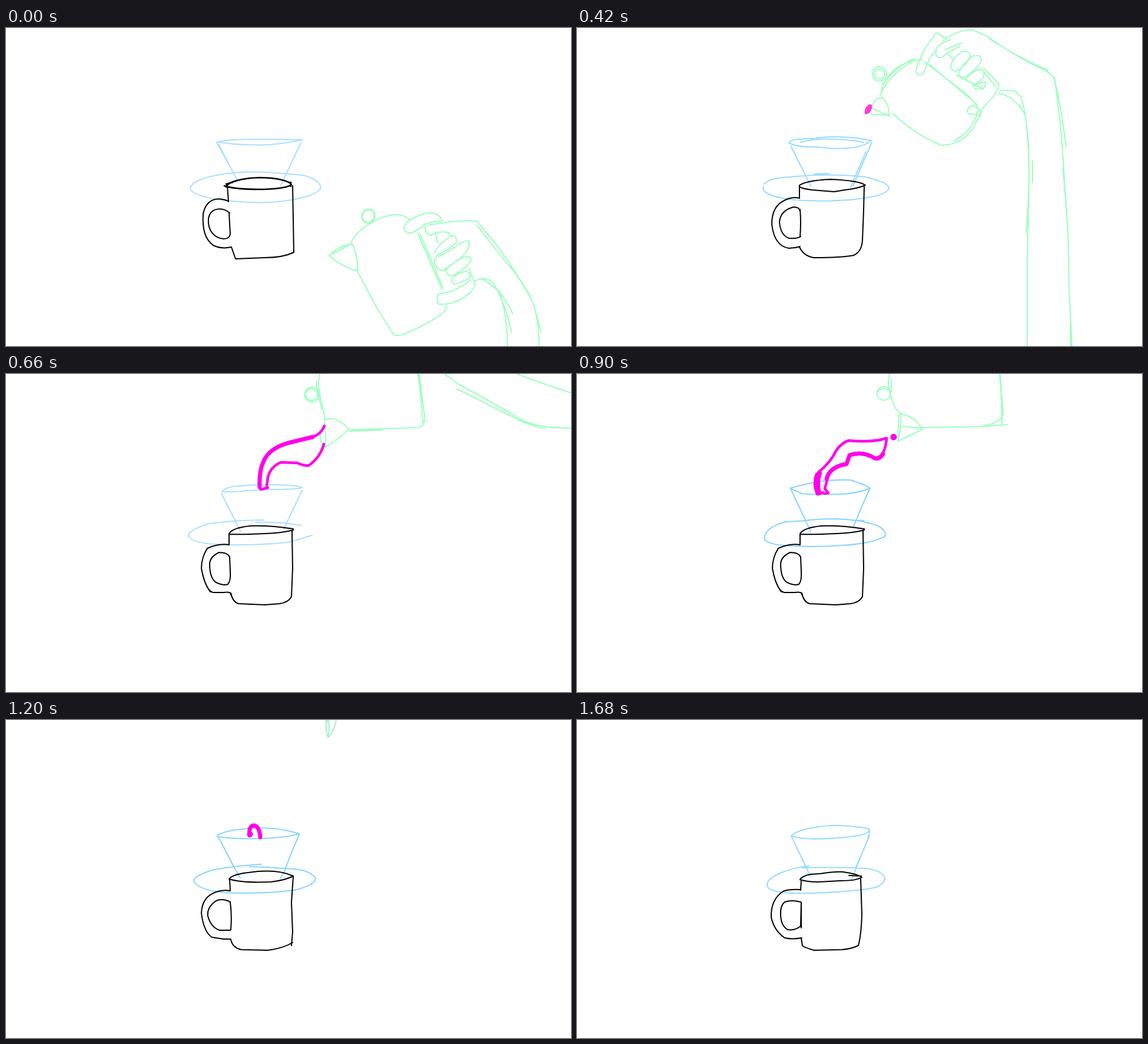
Write an HTML page without scripts that moves like this. It is 960 px wide and 540 px high and loops after 1740 ms.

```html
<!DOCTYPE html>
<html lang="en">
<head>
<meta charset="utf-8">
<title>Pour-over coffee</title>
<style>
html, body { margin: 0; width: 100%; height: 100%; overflow: hidden; background: #fff; }
svg { display: block; width: 100vw; height: 100vh; }
path, circle, ellipse { fill: none; stroke-width: 2; stroke-linecap: round; stroke-linejoin: round; }
.mug { stroke: #000; }
.cone { stroke: #98dbff; }
.pale { stroke: #a8dfff; }
.deep { stroke: #86d4ff; }
.pot { stroke: #9cffbe; }
.pour { stroke: #ff00ea; }
.pour, .pour path { stroke-width: 4.5; }
.fat, .pour .fat { stroke-width: 7; }
.drop { fill: #ff00ea; stroke: none; }
/* 29 drawings, 60 ms each */
.frame { visibility: hidden; animation: show 1740ms step-end infinite; animation-delay: calc((var(--i) - 29) * 60ms); }
@keyframes show { 0% { visibility: visible; } 3.44828%, 100% { visibility: hidden; } }
</style>
</head>
<body>
<svg viewBox="0 0 960 540">
<defs>
  <!-- mug and dripper: a six-drawing wobble -->
  <g id="c0">
    <path class="cone pale" d="M358 194Q370 189 430 189T504 190M362 194Q400 200 450 198Q485 194 503 190M358 194L394 260M361 197L377 228M501 195L482 235L467 267M313 272C318 255 365 246 412 244M378 247C420 241 470 247 505 250C525 255 535 265 535 271C530 285 480 296 435 296.5C390 296 315 290 313 272"/>
    <path class="mug" style="stroke-width:2.6" d="M374 270C375 262 400 255 430 254C460 254 482 260 485 266C478 272 450 274 430 274C400 274 380 271 371 268M374 265L385 262M484 262V269"/>
    <path class="mug" d="M376 267L378 295M487 268L489 381Q470 390 440 390L390 392L383 372M378 294C355 285 340 293 335 315C333 345 340 360 352 369Q367 376 382 372M380 314C368 304 348 304 344 323C342 345 355 357 370 358Q380 358 381 350L379 314"/>
  </g>
  <g id="c1">
    <path class="cone" d="M360 195Q364 187 400 188Q445 180 500 191Q490 200 470 203Q440 207 410 202Q375 203 360 195M380 194Q420 183 487 194M363 200L397 268M501 194L469 268M491 210L465 270M428 247L403 248M318 265Q325 255 362 253Q430 246 490 253Q530 262 530 272Q525 285 480 290Q420 297 360 291Q310 283 317 268"/>
    <path class="mug" d="M378 267Q390 259 430 257Q480 259 490 267Q475 273 455 275L437 278L400 275Q375 272 378 267V289M488 269L487 310L485 360Q484 380 470 386Q450 390 402 390Q385 387 378 372M378 289Q365 286 352 293Q331 303 331 333Q335 370 360 374Q370 374 379 371M379 311Q378 304 368 304Q345 310 344 330Q346 352 360 357Q375 358 380 354M379 308Q381 330 379 354"/>
  </g>
  <g id="c2">
    <path class="cone deep" d="M359 196Q370 189 395 186Q435 180 475 187L498 193Q480 199 440 201Q390 203 359 198M361 199L385 245M384 244L398 268M498 195L485 225L473 257L466 269M434 245Q385 248 350 255Q319 265 319 273Q325 288 370 293Q430 296 490 289Q526 280 526 269Q518 256 490 253Q450 250 414 249"/>
    <path class="mug" d="M379 270Q385 262 412 259Q460 252 488 265Q475 272 450 275Q400 277 379 270M380 271L381 290M488 266L485 310L487 360L485 383M487 378Q470 388 445 391L400 390Q385 387 382 373M380 290Q368 288 357 292Q333 300 332 328Q336 360 350 369L370 372L382 372M381 309Q368 302 357 307Q341 318 343 333Q348 352 363 357L381 357M381 310Q384 330 382 356"/>
  </g>
  <path id="mug" class="mug" d="M379 271Q385 261 415 258Q450 257 488 263V265Q470 270 440 271Q400 273 379 272V289M486 266L487 330L485 378Q480 388 465 390L440 392L395 390Q385 387 382 372M379 290Q362 287 342 296Q332 312 332 330Q336 355 347 370M333 335Q340 368 352 371L370 371Q383 369 382 375M380 311Q377 303 362 303Q347 310 346 322Q346 347 357 354Q370 360 377 357Q382 352 381 335L380 311"/>
  <g id="c3">
    <path class="cone deep" d="M362 194Q385 187 410 183Q440 179 465 180Q490 188 498 194Q480 202 450 204Q410 206 382 203L362 194M364 197L377 225L397 267M497 196L486 220L469 261M390 249L355 251Q320 260 318 279Q320 288 350 291Q400 295 450 291Q500 288 523 276Q527 266 510 257Q480 247 440 246Q410 246 385 249M474 249H488"/>
    <use href="#mug"/>
  </g>
  <g id="c4">
    <path class="cone" d="M364 197C375 185 415 179 445 179Q480 181 497 185Q497 192 480 196Q440 202 400 202Q375 201 364 197M365 199L397 266M497 187L495 200L466 272M497 197L473 252M394 248C360 252 322 265 323 281C325 295 370 295 400 294C450 292 490 289 508 284Q523 278 523 268Q518 255 490 252Q440 249 383 251"/>
    <path class="mug" d="M379 271Q382 265 397 262L413 261Q440 257 452 258Q475 261 484 267Q475 273 447 273L410 275Q390 275 379 271M462 264L483 265M381 272L380 289M482 270L484 330Q483 365 478 383Q465 389 450 390L403 391Q385 386 383 383L381 371M380 288Q360 287 350 291Q329 305 330 335Q335 358 353 370Q365 373 382 370M380 309Q365 305 353 309Q345 315 346 332Q347 350 358 356Q370 358 380 350L381 310V353"/>
  </g>
  <g id="c5">
    <path class="cone pale" d="M367 200Q375 190 400 190Q440 186 480 189Q500 190 503 193Q490 196 460 196L410 198Q385 201 367 200M366 203L399 268M503 198L472 263M438 248Q390 248 345 254Q310 265 310 275Q315 288 370 290Q440 291 483 285L520 274M424 252Q470 251 501 257"/>
    <use href="#mug"/>
  </g>

  <!-- kettle with fingers, and the arm behind it -->
  <g id="rise" class="pot">
    <ellipse cx="615.5" cy="319.5" rx="10.5" ry="11.5" transform="rotate(25 615.5 319.5)" style="stroke-width:3"/>
    <path d="M585 368L587 362Q595 348 612 336Q640 317 665 317Q680 318 686 326M549 386L588 366Q597 385 598 410L594 412Q565 402 549 386M552 385Q563 370 588 367M597 413L630 475L659 521Q668 524 675 520Q720 502 745 482L749 471"/>
    <path d="M686 348Q674 346 677 336Q685 322 715 314Q735 312 741 327M683 349Q700 346 712 333Q722 329 740 328M700 350L741 444M703 349L742 440M735 469Q730 458 735 452L757 447Q775 440 789 428M736 469Q755 470 775 460Q794 448 797 436L787 409"/>
    <path d="M712 337Q712 350 722 352Q735 344 750 347Q757 350 755 354M730 347L733 364M727 383Q735 366 755 354Q767 350 765 364Q755 375 735 384Q724 395 730 403Q735 414 748 411M735 388Q752 380 765 370Q783 358 787 363Q788 378 772 391L745 410M748 410Q760 398 775 390Q792 385 790 395Q780 410 760 420Q750 422 747 412M757 428Q762 418 778 414Q790 412 788 424Q775 432 762 435Q757 434 757 428"/>
    <path d="M716 335Q745 330 767 328Q790 326 801 329Q815 345 840 377Q870 420 895 465L909 516M800 334Q830 375 860 410Q885 440 897 470Q906 505 906 540V700M796 430Q815 420 828 433Q850 470 859 517M808 426Q840 440 861 485M838 445Q852 490 852 540V700"/>
  </g>
  <g id="tilt" class="pot">
    <circle cx="524" cy="109" r="11"/>
    <path d="M515 100L523 96L535 101M497 148Q510 132 530 120Q555 110 580 114L586 124M499 138Q530 107 566 107Q575 109 580 116M453 175Q470 162 491 157L492 152Q504 165 505 202L501 203M495 155Q500 180 505 200M453 175Q480 195 500 200M455 174L490 160M456 176L478 190M501 205L525 253Q545 290 568 318L612 298Q645 283 656 270L654 258M520 240L540 275M587 303L640 282"/>
    <path d="M645 116Q640 105 632 104L580 124Q570 130 575 138Q583 145 600 138L640 120M599 142L642 235L645 236M606 146L640 225M628 250Q627 242 645 235L670 225M628 250Q630 262 640 262Q680 250 704 238L692 202"/>
    <path d="M670 139Q650 133 630 146Q618 147 617 138Q620 125 650 121M628 143L632 160M626 175Q628 160 645 147Q665 142 665 155Q655 165 635 175Q628 178 626 172L632 195M632 188Q640 175 660 165Q680 155 691 157Q690 172 672 185Q650 200 635 203Q630 195 632 188M638 205L650 209M650 205Q660 195 680 182Q698 175 695 188Q680 203 660 213Q650 213 650 205M658 216Q665 207 683 204Q690 207 685 215L665 222L658 216"/>
  </g>
  <path id="tiltArm" class="pot" d="M625 130Q650 118 690 121Q740 132 780 150L805 163Q818 200 820 240M690 120Q750 133 803 155Q815 200 828 280Q845 430 851 540V760M775 152Q815 185 819 240M845 453Q852 500 850 540M697 208Q740 230 752 250Q765 290 766 308M700 213Q735 215 757 258Q768 330 768 420L766 540V760M769 410V488"/>
  <g id="tip" class="pot">
    <circle cx="514" cy="78" r="12"/><circle cx="514" cy="78" r="8.5"/>
    <path d="M517 108Q520 90 540 70Q560 55 587 54M520 95Q545 62 575 52M515 115Q525 85 568 58M500 137Q505 120 517 118Q530 125 530 148L500 147L496 143M499 135L531 150M537 145Q570 178 618 199Q640 200 660 185Q675 170 680 155M640 192Q670 178 682 140Q678 125 655 107Q620 80 590 57M600 63L680 130"/>
    <path d="M576 73Q578 60 590 37L610 8L627 17M576 75Q580 83 588 78L600 50Q605 42 612 40M691 68L717 95Q715 112 690 135L683 150M692 76L712 100M663 143Q663 133 673 132Q690 140 685 147L665 146M680 156L686 148"/>
    <path d="M635 20Q610 28 609 40Q610 52 620 50Q635 38 650 32M628 42L640 55M625 37L655 25M635 65Q638 50 655 40Q668 38 668 48Q660 65 645 73Q636 74 635 65M648 78Q655 60 672 48Q690 43 686 58Q675 75 660 83Q650 85 648 78M660 88Q665 78 683 70Q695 70 690 85Q680 95 672 97M673 100Q682 92 694 92Q695 100 688 104L676 103M645 80L690 103"/>
  </g>
  <path id="tipArm" class="pot" d="M622 22Q645 3 672 3L697 14Q740 45 785 67Q805 75 812 88Q825 150 831 202M700 18Q750 50 800 72M811 83Q825 180 828 260Q836 350 836 440L841 540V1000M826 240L833 330M838 505L839 540M718 107Q750 100 757 125Q768 170 768 260L765 400V1000M716 110Q750 120 762 150L767 195Q770 270 763 348M774 226V262"/>
  <g id="flat" class="pot">
    <circle cx="520" cy="35" r="12.5"/><circle cx="519" cy="35" r="10"/>
    <path d="M695 -40L600 -32Q540 -30 533 0Q528 20 538 55L542 77M527 12Q528 30 537 60M542 78Q560 70 582 93Q570 108 543 124M541 80Q544 100 543 124Q530 118 536 95M583 95Q640 93 700 91Q712 90 711 70L702 0L695 -40M585 97L640 95M700 0Q706 40 708 82L714 80"/>
  </g>
  <path id="flatArm" class="pot" d="M725 -15L745 0L770 18Q830 50 880 80Q910 92 960 92H1200M766 25Q830 58 880 82Q900 90 915 92M868 0Q900 12 960 32L1100 80"/>
  <g id="away" class="pot">
    <circle cx="521" cy="33" r="11.5"/>
    <path d="M511 30Q518 22 528 27M533 -12L531 0Q526 20 535 42Q540 62 552 68M534 10V30M550 66Q552 90 545 114L587 94Q575 72 550 68M547 68L545 110M553 89L585 92M587 91L690 89L731 86M717 -70L718 0Q722 40 722 86M719 0L724 70Q715 85 690 88"/>
  </g>

  <!-- water -->
  <g id="stream" class="pour">
    <path d="M541 88Q535 103 520 107L480 116Q445 126 437 150Q430 165 430 193L433 196L445 193M540 119Q535 140 515 155Q508 157 495 151L467 150Q450 157 445 175L443 190"/>
    <path class="fat" d="M521 107L480 117Q445 127 437 150Q430 165 431 191"/>
  </g>
  <g id="loose" class="pour">
    <path d="M526 109Q500 117 462 113Q445 118 435 140Q425 155 410 167L405 185L410 204L418 201M414 168Q408 185 413 203M526 111Q523 140 508 143Q485 130 463 138L458 153Q430 157 425 180L421 195L427 202L420 203"/>
    <path class="fat" d="M408 171Q402 185 409 203M520 136Q514 145 506 143Q485 130 463 138L458 153Q430 157 424 178"/>
  </g>
</defs>

<g class="frame" style="--i:0"><use href="#c0"/><use href="#rise"/></g>
<g class="frame" style="--i:1"><use href="#c1"/><use href="#rise" transform="translate(-23 -52)"/></g>
<g class="frame" style="--i:2"><use href="#c2"/><use href="#rise" transform="translate(-46 -104)"/></g>
<g class="frame" style="--i:3"><use href="#c3"/><g transform="translate(23 52)"><use href="#tilt"/><use href="#tiltArm"/></g></g>
<g class="frame" style="--i:4"><use href="#c4"/><use href="#tilt"/><use href="#tiltArm"/></g>
<g class="frame" style="--i:5"><use href="#c5"/><use href="#tilt" transform="translate(-3 -10) rotate(-9 524 108)"/><use href="#tiltArm" transform="translate(5 -27)"/></g>
<g class="frame" style="--i:6"><use href="#c0"/><use href="#tilt" transform="translate(-7 -20) rotate(-17 524 108)"/><use href="#tiltArm" transform="translate(8 -55)"/></g>
<g class="frame" style="--i:7"><use href="#c1"/><use href="#tip"/><use href="#tipArm"/><ellipse class="drop" style="fill:#ff3ae4" cx="495" cy="138" rx="5" ry="9.5" transform="rotate(30 495 138)"/></g>
<g class="frame" style="--i:8"><use href="#c2"/><use href="#tip" transform="translate(2 -11) rotate(-12 514 78)"/><use href="#tipArm" transform="translate(0 -45) rotate(-14 720 100)"/><path class="pour" d="M511 119Q485 126 478 146Q484 156 496 148Q508 142 515 132"/></g>
<g class="frame" style="--i:9"><use href="#c3"/><use href="#tip" transform="translate(3 -22) rotate(-24 514 78)"/><use href="#tipArm" transform="translate(-5 -95) rotate(-26 720 100)"/><path class="pour" d="M526 104Q480 114 460 134Q446 152 452 162Q462 164 475 150Q512 152 529 122"/></g>
<g class="frame" style="--i:10"><use href="#c4"/><use href="#flat" transform="translate(-2 11) rotate(11 520 35)"/><use href="#flatArm" transform="translate(-5 30) rotate(14 745 0)"/><path class="pour" d="M533 98Q522 108 485 117Q448 127 438 155Q432 172 438 178Q446 176 450 164Q466 146 500 153Q522 148 532 126"/></g>
<g class="frame" style="--i:11"><use href="#c5"/><use href="#flat"/><use href="#flatArm"/><use href="#stream"/></g>
<g class="frame" style="--i:12"><use href="#c0"/><use href="#flat" transform="translate(2 -1)"/><use href="#flatArm" transform="translate(20 -32)"/><use href="#stream" transform="translate(-2 1)"/></g>
<g class="frame" style="--i:13"><use href="#c1"/><use href="#flat" transform="translate(5 -4)"/><use href="#flatArm" transform="translate(40 -66)"/><use href="#stream" transform="translate(-4 1)"/></g>
<g class="frame" style="--i:14"><use href="#c2"/><use href="#away" transform="translate(-2 2)"/><use href="#loose" transform="translate(8 -4)"/></g>
<g class="frame" style="--i:15"><use href="#c3"/><use href="#away"/><use href="#loose"/><circle class="drop" cx="538" cy="107" r="5.5"/></g>
<g class="frame" style="--i:16"><use href="#c4"/><use href="#away" transform="translate(3 -4)"/><use href="#loose" transform="translate(-5 4)"/></g>
<g class="frame" style="--i:17"><use href="#c5"/><use href="#away" transform="translate(8 -12)"/><path class="pour" d="M410 202Q402 178 420 158Q440 130 470 128Q495 128 496 138Q490 152 470 148Q430 158 424 202"/></g>
<g class="frame" style="--i:18"><use href="#c0"/><use href="#away" transform="translate(14 -28)"/><path class="pour" d="M410 201Q404 172 425 152Q445 137 462 146Q468 158 450 162Q428 172 427 201"/></g>
<g class="frame" style="--i:19"><use href="#c1"/><use href="#away" transform="translate(8 -58)"/><path class="pour" d="M412 200Q406 172 425 160Q442 158 442 172Q432 180 430 201"/></g>
<g class="frame" style="--i:20"><use href="#c2"/><path style="stroke:#a6f0d3" d="M546 0Q541 15 547 29Q550 15 548 0M544 0V20M561 0Q558 18 548 29"/><path class="pour fat" d="M414 196Q412 179 422 179Q431 182 432 199"/><circle class="drop" cx="414.5" cy="194" r="5"/></g>
<g class="frame" style="--i:21"><use href="#c3"/><path class="pour fat" d="M416 200Q422 185 429 200"/></g>
<g class="frame" style="--i:22"><use href="#c4"/></g>
<g class="frame" style="--i:23"><use href="#c5"/></g>
<g class="frame" style="--i:24"><use href="#c0"/></g>
<g class="frame" style="--i:25"><use href="#c1"/></g>
<g class="frame" style="--i:26"><use href="#c2"/></g>
<g class="frame" style="--i:27"><use href="#c3"/></g>
<g class="frame" style="--i:28"><use href="#c4"/></g>
</svg>
</body>
</html>
```
